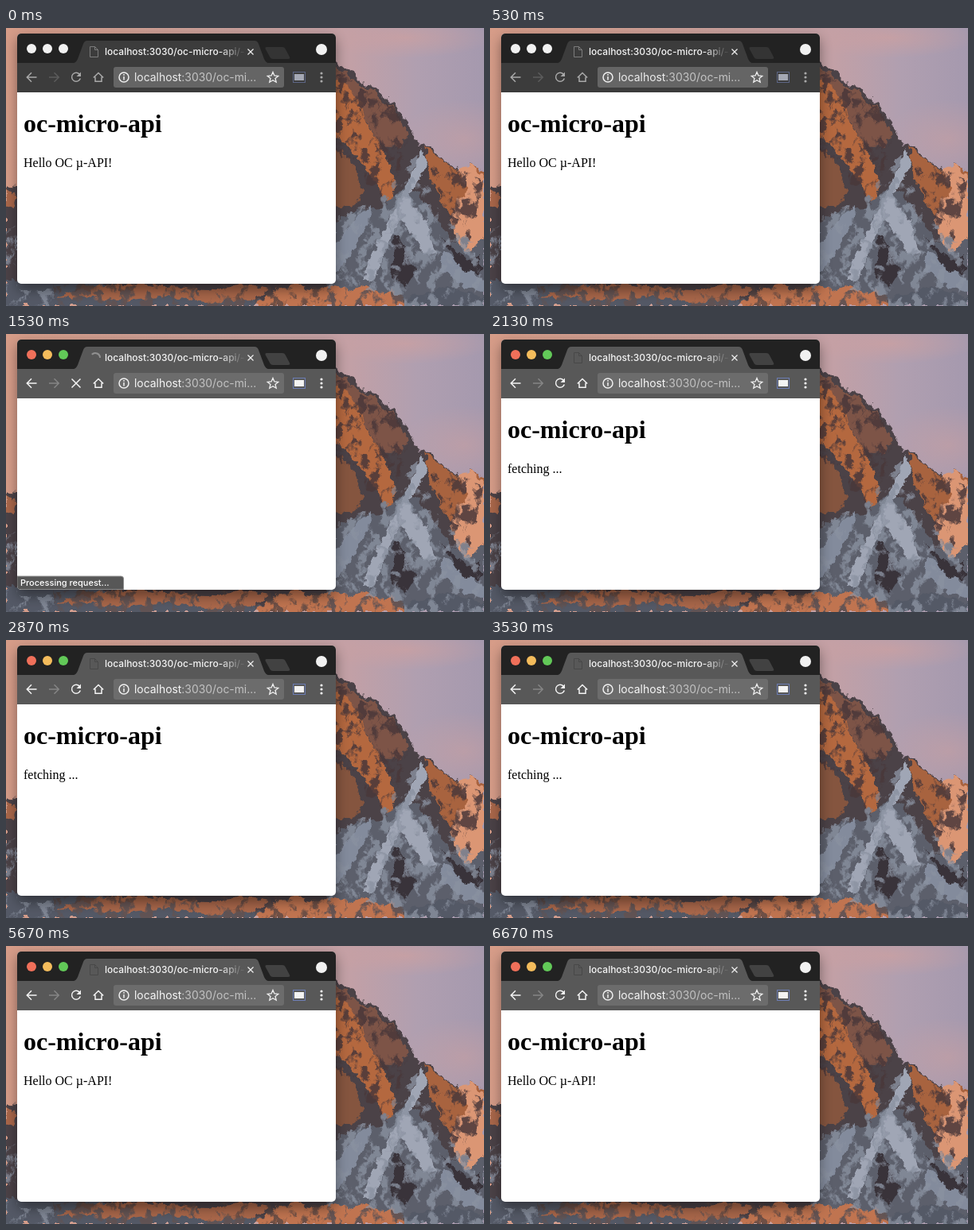
An HTML page for the animation above (6.74 s loop, 600 px wide and 350 px high).

```html
<!DOCTYPE html>
<html lang="en">
<head>
<meta charset="utf-8">
<title>oc-micro-api</title>
<style>
  html, body { margin: 0; width: 100%; height: 100%; overflow: hidden; background: #b09ead; }
  svg { display: block; width: 100%; height: 100%; }

  #stage { animation: focus 6740ms step-end infinite; }
  .loading { opacity: 0; animation: loading 6740ms step-end infinite; }
  .loaded { animation: loaded 6740ms step-end infinite; }
  .fetching { opacity: 0; animation: fetching 6740ms step-end infinite; }
  .hello { animation: hello 6740ms step-end infinite; }
  .spinner { transform-origin: 112px 30px; animation: spin 6740ms linear infinite; }

  /* Window is in the background first, then takes focus */
  @keyframes focus {
    0% {
      --bar: #3c3c3c; --box: #656565; --icon: #a9a9a9; --dim: #5c5c5c; --file: #7c7c7c; --plus: #343434;
      --red: #f1f1f1; --yellow: #f1f1f1; --green: #f1f1f1; --frame: #5d6685; --view: #a4a8b4; --host: #ececec; --path: #c4c4c4;
    }
    13.8%, 100% {
      --bar: #585858; --box: #6c6c6c; --icon: #f3f3f3; --dim: #858585; --file: #484848; --plus: #424242;
      --red: #f0705a; --yellow: #f4bc5c; --green: #62c958; --frame: #6c7db4; --view: #f3f3f3; --host: #f6f6f6; --path: #c2c2c2;
    }
  }
  @keyframes loading { 0% { opacity: 0 } 16.77% { opacity: 1 } 27.74%, 100% { opacity: 0 } }
  @keyframes loaded { 0% { opacity: 1 } 16.77% { opacity: 0 } 27.74%, 100% { opacity: 1 } }
  @keyframes fetching { 0% { opacity: 0 } 27.74% { opacity: 1 } 60.39%, 100% { opacity: 0 } }
  @keyframes hello { 0% { opacity: 1 } 16.77% { opacity: 0 } 60.39%, 100% { opacity: 1 } }
  @keyframes spin { from { transform: rotate(212deg) } to { transform: rotate(-2308deg) } }

  .ui { font-family: Inter, Roboto, sans-serif; }
  .page { font-family: "Liberation Serif", "Times New Roman", serif; font-size: 16px; }
  .page .title { font-size: 32px; font-weight: bold; }
  .bar { fill: var(--bar); }
  .line { fill: none; stroke: var(--icon); stroke-width: 1.5; }
  .bright { stroke: #f1f1f1; }
  .solid { fill: var(--icon); }
</style>
</head>
<body>
<svg id="stage" viewBox="0 0 600 350">
  <defs>
    <linearGradient id="sky">
      <stop offset="0" stop-color="#d69c88"/>
      <stop offset=".5" stop-color="#c8a09c"/>
      <stop offset=".72" stop-color="#c2a0a6"/>
      <stop offset=".86" stop-color="#b09fb0"/>
      <stop offset="1" stop-color="#a599ae"/>
    </linearGradient>
    <radialGradient id="glow">
      <stop offset="0" stop-color="#cda0a0"/>
      <stop offset="1" stop-color="#cda0a0" stop-opacity="0"/>
    </radialGradient>
    <linearGradient id="fade" gradientUnits="userSpaceOnUse" x1="268" x2="297" y1="0" y2="0">
      <stop offset="0" stop-color="#f4f4f4"/>
      <stop offset="1" stop-color="#f4f4f4" stop-opacity=".1"/>
    </linearGradient>
    <filter id="rough" filterUnits="userSpaceOnUse" x="0" y="0" width="600" height="350" color-interpolation-filters="sRGB">
      <feTurbulence type="fractalNoise" baseFrequency=".1" numOctaves="3" seed="4"/>
      <feDisplacementMap in="SourceGraphic" scale="11" xChannelSelector="R" yChannelSelector="G"/>
    </filter>
    <!-- Breaks a flat fill into irregular patches -->
    <filter id="patches" filterUnits="userSpaceOnUse" x="0" y="0" width="600" height="350" color-interpolation-filters="sRGB">
      <feTurbulence type="fractalNoise" baseFrequency=".07 .05" numOctaves="4" seed="9"/>
      <feColorMatrix values="0 0 0 0 0  0 0 0 0 0  0 0 0 0 0  9 0 0 0 -4.6"/>
      <feComposite in="SourceGraphic" operator="in"/>
    </filter>
    <filter id="shadow" filterUnits="userSpaceOnUse" x="-20" y="-20" width="640" height="400">
      <feGaussianBlur stdDeviation="8"/>
    </filter>
    <clipPath id="window"><rect x="14" y="7" width="400" height="315" rx="5"/></clipPath>
  </defs>

  <!-- Desktop -->
  <rect width="600" height="350" fill="url(#sky)"/>
  <ellipse cx="500" cy="12" rx="110" ry="26" fill="url(#glow)" opacity=".7"/>
  <ellipse cx="575" cy="140" rx="80" ry="50" fill="url(#glow)" opacity=".5"/>
  <g filter="url(#rough)">
    <path fill="#4b4247" d="M400 36 414 43 424 52 437 58 450 71 464 74 472 86 489 96 497 111 508 126 518 148 527 146 535 152 543 163 562 173 573 182 584 171 592 183 620 190V370H-20V196L14 200H400Z"/>
    <path fill="#7d5447" d="M400 42 424 56 448 74 462 77 468 90 486 99 492 114 505 130 496 148 480 150 466 140 452 118 438 90 400 70Z"/>
    <path fill="#b4683f" d="M400 60 430 72 446 96 452 120 470 146 480 170 490 198 482 222 470 208 458 186 440 162 424 142 400 128Z"/>
    <path fill="#85553f" d="M400 150 424 158 440 180 448 206 436 226 400 222Z"/>
    <path fill="#5c5f6b" d="M400 250 440 230 470 226 500 200 520 210 540 240 560 270 600 264V350H400Z"/>
    <path fill="#a8633f" d="M527 148 543 164 562 175 574 183 584 173 615 190V214L580 226 562 240 548 222 540 200 532 190Z"/>
    <path fill="#db9674" d="M566 178 584 172 600 188V262L580 284 566 270 558 244 566 220 580 204Z"/>
    <path fill="#a0a6b5" d="M522 152 530 166 520 188 505 212 512 226 528 242 540 286 524 284 508 256 496 240 484 262 470 300 460 318 448 316 460 284 478 248 492 220 508 186Z"/>
    <path fill="#838b9c" d="M438 240 460 222 454 246 436 280 414 310 400 312 414 274ZM548 282 566 290 590 314 612 322V338L570 322 545 302Z"/>
    <path fill="#39333a" d="M488 262 504 280 514 306 502 326 484 314ZM546 262 578 292 596 284V310L572 304Z"/>
    <path fill="#545966" d="M-10 318H100L190 336H290L320 342 340 360H-10ZM506 338 554 326 612 342V360H500Z"/>
    <path fill="#a9674a" d="M60 340 100 326 150 322 200 324 250 330 300 324 330 330 310 342 250 344 200 338 150 344 100 338ZM-10 200 6 205 14 214 8 226-10 220Z"/>
    <path fill="#c07450" d="M312 352 328 336 345 326 366 322 384 332 402 322 430 330 450 322 470 335 486 330 506 356Z"/>
    <g filter="url(#patches)">
      <path fill="#49383a" d="M400 44 424 58 448 78 462 80 486 100 505 132 490 200 480 220 400 140ZM527 150 562 177 600 190 580 280 556 246Z" opacity=".85"/>
      <path fill="#8a91a1" d="M400 246 470 216 516 160 528 196 550 240 600 280V350H400ZM-10 250H14V330H240L330 350H-10Z" opacity=".8"/>
      <path fill="#5a4844" d="M60 324H310L400 326 500 336V350H60Z" opacity=".8"/>
    </g>
  </g>

  <!-- Window -->
  <rect x="14" y="13" width="400" height="317" rx="6" opacity=".4" filter="url(#shadow)"/>
  <g clip-path="url(#window)">
    <rect x="14" y="7" width="400" height="315" fill="#fff"/>
    <rect x="14" y="7" width="400" height="38" fill="#222"/>
    <rect class="bar" x="14" y="44" width="400" height="37"/>
    <path class="bar" d="M83 44.500Q88 44 90 39L97 20Q98.500 16 102 16H312Q315.500 16 317 20L324 39Q326 44 331 44.500Z"/>
    <path fill="var(--plus)" d="M327 24H347Q349.500 24 350.500 26L356 36.500Q357 39 354 39H335Q332.500 39 331.500 37L325.500 26Q325 24 327 24Z"/>

    <circle cx="32" cy="26" r="6" fill="var(--red)"/>
    <circle cx="52" cy="26" r="6" fill="var(--yellow)"/>
    <circle cx="72" cy="26" r="6" fill="var(--green)"/>
    <circle cx="396" cy="27" r="7" fill="#f1f1f1"/>

    <path class="loaded" d="M105.500 23.500H111.500L115.500 27.500V36.500H105.500ZM111.500 23.500V27.500H115.500" fill="none" stroke="var(--file)"/>
    <g class="loading">
      <path class="spinner" d="M107.800 25.700A6 6 0 0 1 118 30" fill="none" stroke="#929292" stroke-width="2"/>
    </g>
    <text class="ui" x="124" y="34" font-size="12" font-weight="500" fill="url(#fade)">localhost:3030/oc-micro-api/-</text>
    <path class="line bright" d="M303.500 26.500 310.500 33.500M310.500 26.500 303.500 33.500" style="stroke-width:1.200"/>

    <!-- Toolbar -->
    <path class="line" d="M38.500 62H26.500M32 56.300 26.300 62 32 67.700"/>
    <path class="line" style="stroke:var(--dim)" d="M54 62H66M60.500 56.300 66.200 62 60.500 67.700"/>
    <g class="loaded">
      <path class="line" d="M92.200 58.200A5.500 5.500 0 1 0 93.300 63.500"/>
      <path class="solid" d="M94 55.500V61H88.500Z"/>
    </g>
    <path class="line loading" d="M82.500 56.500 93.500 67.500M93.500 56.500 82.500 67.500"/>
    <path class="line" d="M109.800 62.500 116 56.500 122.200 62.500M112 61.500V67.300H120V61.500"/>

    <rect x="135" y="49" width="214" height="26" rx="3" fill="var(--box)"/>
    <circle class="line bright" cx="148" cy="62" r="6"/>
    <path class="line bright" d="M148 61V65.500M148 58V59.700"/>
    <text class="ui" x="161" y="67" font-size="13.900" fill="var(--path)"><tspan fill="var(--host)">localhost</tspan>:3030/oc-mi...</text>
    <path class="line bright" style="stroke-width:1.300" d="M335 55.500 336.900 60 341.700 60.400 338 63.500 339.200 68.200 335 65.700 330.800 68.200 332 63.500 328.300 60.400 333.100 60Z"/>

    <rect x="360.500" y="55.500" width="15" height="13" fill="none" stroke="var(--frame)"/>
    <rect x="362" y="58" width="12" height="8" fill="var(--view)"/>
    <circle class="solid" cx="396" cy="57" r="1.600"/>
    <circle class="solid" cx="396" cy="62" r="1.600"/>
    <circle class="solid" cx="396" cy="67" r="1.600"/>

    <!-- Page -->
    <g class="page">
      <text class="title loaded" x="22" y="131">oc-micro-api</text>
      <text class="hello" x="22" y="175">Hello OC µ-API!</text>
      <text class="fetching" x="22" y="175">fetching ...</text>
    </g>
    <g class="loading">
      <path d="M14 305H144.500Q147.500 305 147.500 308V321.500H14Z" fill="#575757" stroke="#8b8b8b"/>
      <text class="ui" x="18" y="317" font-size="11" font-weight="500" fill="#fff">Processing request...</text>
    </g>
  </g>
</svg>
</body>
</html>
```
